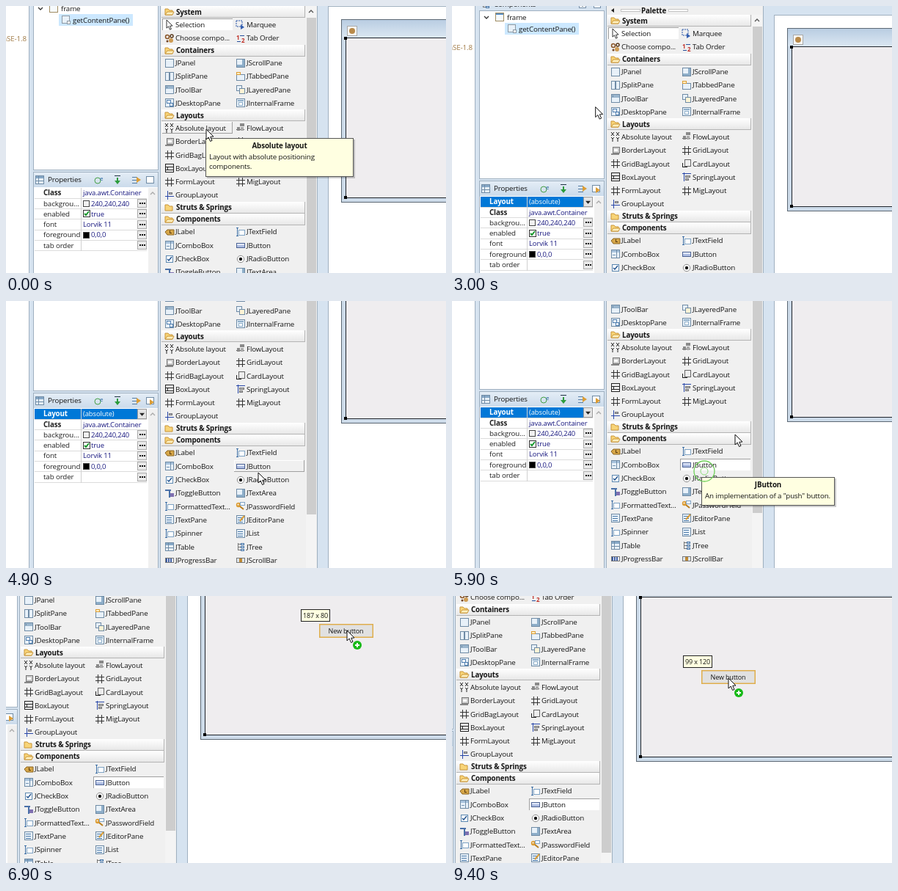
Write an HTML page with a canvas that moves like this. It is 600x364 px and loops after 9500 ms.

```html
<!DOCTYPE html>
<html lang="en">
<head>
<meta charset="utf-8">
<style>
  html, body { margin: 0; width: 100%; height: 100%; overflow: hidden; background: #fff; }
  canvas { display: block; }
</style>
</head>
<body>
<canvas id="stage" width="600" height="364"></canvas>
<script>
const g = document.getElementById('stage').getContext('2d');
const LOOP = 9500;
const BLUE = '#d6e3f0', EDGE = '#9fb0c0', INK = '#161616', STEEL = '#6f8ba5', PALE = '#e8f1f9', GOLD = '#dc9d35';

// Tracks: [time, x, y], eased between points
const camera = [[0, 0, 0], [800, 0, 1], [1600, 0, 19], [2700, 0, 19], [4200, 0, -50], [5000, 0, -103],
  [6000, 0, -103], [6900, -192, -72], [7300, -206, -60], [7800, -206, -49], [9400, -206, -42]];
const pointer = [[0, 273, 168], [700, 273, 168], [1700, 122, 26], [2100, 120, 20], [2600, 120, 20], [3600, 335, 320],
  [4200, 352, 371], [4800, 344, 335], [5700, 344, 335], [5900, 386, 285], [6900, 657, 119], [7800, 657, 94], [9400, 583, 154]];
const drop = [[5900, -138, 280], [6900, 187, 80], [7800, 192, 52], [9400, 99, 120]];
const clicks = [[500, 273, 168], [2200, 120, 20], [5600, 344, 335]];

function at(keys, t) {
  const i = keys.findIndex(k => k[0] > t);
  if (i < 0) return keys[keys.length - 1].slice(1);
  if (i === 0) return keys[0].slice(1);
  const a = keys[i - 1], b = keys[i], u = (t - a[0]) / (b[0] - a[0]), e = u * u * (3 - 2 * u);
  return [a[1] + (b[1] - a[1]) * e, a[2] + (b[2] - a[2]) * e];
}

function rect(c, x, y, w, h) { g.fillStyle = c; g.fillRect(x, y, w, h); }
function box(line, fill, x, y, w, h) { rect(line, x, y, w, h); rect(fill, x + 1, y + 1, w - 2, h - 2); }
function disc(c, x, y, r) { g.fillStyle = c; g.beginPath(); g.arc(x, y, r, 0, 7); g.fill(); }
function ring(c, x, y, r, w = 1) { g.strokeStyle = c; g.lineWidth = w; g.beginPath(); g.arc(x, y, r, 0, 7); g.stroke(); }
function path(pts, fill, line, w = 1) {
  g.beginPath();
  for (let i = 0; i < pts.length; i += 2) g.lineTo(pts[i], pts[i + 1]);
  if (fill) { g.closePath(); g.fillStyle = fill; g.fill(); }
  if (line) { g.strokeStyle = line; g.lineWidth = w; g.stroke(); }
}
function shade(top, bottom, y, h) {
  const fill = g.createLinearGradient(0, y, 0, y + h);
  fill.addColorStop(0, top);
  fill.addColorStop(1, bottom);
  return fill;
}
function text(s, x, y, { color = INK, bold = false, align = 'left', size = 9.8 } = {}) {
  g.font = `${bold ? 'bold ' : ''}${size}px "Open Sans", "Noto Sans", sans-serif`;
  g.letterSpacing = '-0.14px';
  g.textAlign = align;
  g.fillStyle = color;
  g.fillText(s, x, y + 3.5);
}
function moved(x, y, draw) { g.save(); g.translate(x, y); draw(); g.restore(); }

const arrow = [0, 0, 0, 14, 3.2, 11, 5.6, 16.5, 8, 15.4, 5.7, 10.3, 10, 10];
const pane = () => box(STEEL, PALE, -6, -6, 12, 12);
const hash = () => [-3, 2].forEach(p => { rect('#333', p, -6, 1, 12); rect('#333', -6, p, 12, 1); });
const field = () => { box('#7fa3c4', '#fff', -3, -3, 9, 8); rect('#3c6ea5', -5, -6, 1, 12); rect('#3c6ea5', -6, -6, 3, 1); rect('#3c6ea5', -6, 5, 3, 1); };
const page = () => { pane(); for (let y = -3; y < 5; y += 3) rect('#4b79a8', -4, y, 7, 1); };

// Icons are drawn around their own centre
const icons = {
  pane, hash, field, page,
  cursor() { moved(-4, -6, () => { g.scale(.8, .8); path(arrow.concat(0, 0), '#fff', '#000'); }); },
  marquee() { g.setLineDash([2, 1]); path([-6, -5, 2, -5, 2, 3, -6, 3, -6, -5], null, '#2856a8'); g.setLineDash([]); path([0, 0, 0, 7, 5, 4], '#345fb0'); },
  choose() { ring('#8a5527', -3, -2, 2.5, 1.5); ring('#5a3a1c', 3, -3, 2, 1.5); disc('#cf9c53', 2, 3, 3); disc('#704020', -3, 4, 1.5); },
  order() { text('1', -6, -2, { color: '#c03028', size: 8, bold: true }); text('2', 1, 2, { color: '#c03028', size: 8, bold: true }); rect('#274f9c', -1, -4, 6, 1); rect('#274f9c', -5, 4, 5, 1); },
  split() { pane(); rect(STEEL, -1, -6, 2, 12); },
  scroll() { pane(); rect('#8eaec9', 2, -5, 3, 10); rect('#8eaec9', -5, 2, 10, 3); },
  tabs() { box(STEEL, PALE, -6, -3, 12, 9); box(GOLD, '#fff0c6', -6, -6, 6, 4); },
  bar() { pane(); rect('#9bb6cd', -5, -5, 10, 4); rect(STEEL, -4, -4, 1, 2); },
  layers() { box(STEEL, PALE, -6, -6, 8, 8); box(STEEL, '#fff3d5', -2, -2, 8, 8); },
  frame() { box('#a08c62', '#f6fafd', -6, -6, 12, 12); rect('#5b8fc4', -5, -5, 10, 2); },
  inner() { pane(); rect('#8eaec9', -4, -4, 8, 2); box('#8eaec9', '#fff', -3, -1, 6, 5); },
  desktop() { pane(); box('#4d7daf', '#fff', -4, -4, 6, 5); box('#4d7daf', '#fff', 0, 0, 5, 5); },
  xy() {
    for (const x of [-6, 1]) {
      path([x, -6, x + 4, -1], null, '#222'); path([x + 4, -6, x, -1], null, '#222');
      path([x, 1, x + 2, 3, x + 4, 1], null, '#222'); rect('#222', x + 1.5, 3, 1, 4);
    }
  },
  flow() { rect('#8a8a8a', -1, -6, 6, 4); rect('#555', -6, 2, 11, 1); rect('#8a8a8a', -5, -1, 4, 5); rect('#aaa', 0, -1, 4, 5); },
  border() { box('#777', '#ccc', -4, -5, 10, 9); rect('#888', -6, 4, 11, 2); rect('#fff', -2, -2, 5, 3); },
  card() { box('#666', '#eee', -3, -6, 9, 10); rect('#222', -6, 4, 7, 1); rect('#222', -6, -1, 1, 6); },
  rows() { box('#222', '#f0f0f0', -6, -6, 12, 12); rect('#222', -6, -2, 12, 1); rect('#222', -6, 2, 12, 1); rect('#222', -3, -2, 1, 4); },
  spring() { rect('#2947a8', -4, -6, 1, 12); rect('#2947a8', -6, -5, 12, 1); box('#777', '#bbb', -2, -2, 7, 3); box('#777', '#bbb', -2, 2, 5, 3); },
  group() { rect('#2947a8', -3, -6, 1, 12); box('#777', '#aab', -1, -4, 5, 3); rect('#2947a8', -6, 1, 12, 1); },
  label() { path([-6, 0, -3, -3, 6, -3, 6, 4, -3, 4], '#d6a648', '#8a6420'); rect('#5a3c10', 0, -2, 1, 4); rect('#5a3c10', 0, 1, 3, 1); },
  combo() { pane(); rect('#a8c3dd', -5, -5, 10, 3); rect(STEEL, 1, -6, 1, 12); rect('#7394b4', -4, 1, 4, 1); },
  button() { box('#4b6294', '#aebde2', -6, -3, 12, 7); rect('#e3eafa', -5, -2, 10, 2); },
  check() { box('#5b87b0', '#fff', -5, -5, 10, 10); path([-3, 0, -1, 2, 3, -3], null, '#1d4f8c', 1.4); },
  radio() { disc('#fff', 0, 0, 5); ring('#8b8b8b', 0, 0, 4.7); disc('#151515', 0, 0, 2.2); },
  toggle() { rect('#4a70a8', -6, -5, 8, 2); rect('#4a70a8', -1, -5, 2, 11); rect('#7f70b0', 1, 0, 5, 5); },
  key() { disc(GOLD, -3, -2, 3.2); disc('#fff', -3.5, -2.5, 1); path([-1, 0, 4, 4], null, '#b97e1e', 2); box('#7fa3c4', '#fff', -1, -6, 7, 5); },
  pencil() { page(); path([5, -5, -1, 2], null, GOLD, 2); },
  grid() { pane(); rect('#86a8c7', -5, -5, 10, 3); rect(STEEL, -2, -5, 1, 11); rect(STEEL, -5, 1, 11, 1); },
  tree() { rect('#777', -4, -5, 1, 10); for (let i = -1; i < 2; i++) { rect('#777', -4, i * 4, 4, 1); box('#4a76a7', '#cbdff2', 0, i * 4 - 1, 5, 3); } },
  progress() { box('#777', '#fff', -6, -3, 12, 7); for (let x = -5; x < 3; x += 3) rect('#3f5fa5', x, -2, 2, 5); },
  slider() { box('#777', '#dde6ef', -6, -3, 12, 7); rect('#c08a34', -2, -2, 4, 5); }
};

const palette = [
  ['System', 'Selection:cursor Marquee:marquee Choose_compo...:choose Tab_Order:order'],
  ['Containers', 'JPanel:pane JScrollPane:scroll JSplitPane:split JTabbedPane:tabs JToolBar:bar JLayeredPane:layers JDesktopPane:desktop JInternalFrame:inner'],
  ['Layouts', 'Absolute_layout:xy FlowLayout:flow BorderLayout:border GridLayout:hash GridBagLayout:hash CardLayout:card BoxLayout:rows SpringLayout:spring FormLayout:hash MigLayout:hash GroupLayout:group'],
  ['Struts & Springs', ''],
  ['Components', 'JLabel:label JTextField:field JComboBox:combo JButton:button JCheckBox:check JRadioButton:radio JToggleButton:toggle JTextArea:scroll JFormattedText...:field JPasswordField:key JTextPane:page JEditorPane:pencil JSpinner:field JList:page JTable:grid JTree:tree JProgressBar:progress JScrollBar:slider']
];

function drawFolder(x, y, open) {
  path([x - 6, y + 4, x - 6, y - 4, x - 2, y - 4, x, y - 2, x + 4, y - 2, x + 4, y + 4], '#f8d478', '#c99538');
  if (open) path([x - 6, y + 4, x - 3, y, x + 6, y, x + 4, y + 4, x - 6, y + 4], '#fff0bd', '#c99538');
}

function drawItem(entry, column, y, active, px, py) {
  const [name, icon] = entry.replace('_', ' ').split(':');
  const x = column ? 311 : 213, w = 96, top = Math.round(y - 8), h = 16;
  const hovered = px >= x && px < x + w && Math.abs(py - y) < 9;
  if (name === active) {
    rect('#a0a0a0', x, top, w, h);
    rect('#fff', x + 1, top + 1, w - 1, h - 1);
  } else if (hovered) {
    rect('#a0a0a0', x, top, w, h);
    rect('#fff', x, top, w - 1, h - 1);
    rect('#f0f0f0', x + 1, top + 1, w - 2, h - 2);
  }
  moved(column ? 320 : 223, Math.round(y), icons[icon]);
  text(name, column ? 328 : 231, y);
}

function drawPalette(active, px, py) {
  rect(EDGE, 210, -14, 215, 700);
  rect('#f0f0f0', 211, -13, 213, 700);
  path([217, -6, 221, -9, 221, -3], '#222');
  text('Palette', 275, -6, { bold: true, align: 'center' });
  for (const x of [230, 295]) box('#c4c4c4', '#fff', x, -8, 27, 4);
  rect('#f4f4f4', 409, 0, 14, 600);
  path([413, 9, 416, 6, 419, 9], null, '#555', 1.3);
  rect('#cdcdcd', 410, 16, 13, 376);
  let y = 8.2;
  for (const [title, list] of palette) {
    const top = Math.round(y - 8);
    rect('#b4b4b4', 212, top, 196, 16);
    rect(shade('#fff', '#e6e6e6', top, 16), 212, top, 195, 15);
    drawFolder(223, Math.round(y), list);
    text(title, 232, y, { bold: true });
    const items = list ? list.split(' ') : [];
    items.forEach((item, i) => drawItem(item, i % 2, y + 17 + 18.3 * (i >> 1), active, px, py));
    y += items.length ? 34 + 18.3 * (Math.ceil(items.length / 2) - 1) : 16;
  }
}

function drawTree() {
  rect(EDGE, 37, -6, 171, 230);
  rect('#fff', 38, -5, 169, 228);
  text('Components', 57, -14.5);
  moved(46, -15, icons.tree);
  for (const x of [173, 193]) {
    box('#7890a8', '#f4f8fc', x, -19, 10, 10);
    rect('#345', x + 2, -14.5, 6, 1);
  }
  rect('#345', 177.5, -17, 1, 6);
  path([44, 2, 47, 5, 50, 2], null, '#333', 1.3);
  moved(65, 3, icons.frame);
  text('frame', 75, 3);
  rect('#cce8ff', 72, 11, 101, 16);
  moved(82, 19, () => { box('#8d99a3', PALE, -6, -6, 11, 11); box('#8d99a3', '#fff', 1, 1, 5, 5); });
  text('getContentPane()', 91, 19);
}

function drawProperties(laidOut) {
  rect(EDGE, 37, 226, 171, 450);
  rect(shade('#e4edf6', '#cbdbeb', 227, 20), 38, 227, 169, 20);
  rect('#fff', 38, 247, 169, 430);
  moved(46, 237, icons.grid);
  text('Properties', 57, 236.5);
  ring('#45a046', 125, 238, 4);
  text('e', 128, 234, { size: 8, color: '#2563a0' });
  rect('#2c9c3c', 151, 234, 2, 7);
  path([148, 238, 152, 243, 156, 238], '#2c9c3c');
  rect('#234', 148, 231, 8, 1);
  for (let i = 0; i < 3; i++) rect('#557da5', 172, 233 + i * 4, 7, 1);
  path([178, 233, 184, 237, 178, 241], GOLD);
  box(STEEL, '#fff', 191, 232, 11, 10);
  if (laidOut) path([196, 235, 202, 239, 196, 243], GOLD);
  rect('#f0f0f0', 194, 248, 13, 430);
  path([197, 257, 200, 254, 203, 257], null, '#aaa', 1.3);

  const rows = [['Class', 'java.awt.Container'], ['backgrou...', '240,240,240', '#f0f0f0'], ['enabled', 'true', 'check'],
    ['font', 'Lorvik 11'], ['foreground', '0,0,0', '#000'], ['tab order', '']];
  if (laidOut) rows.unshift(['Layout', '(absolute)']);
  rows.forEach(([name, value, mark], i) => {
    const y = 254.7 + i * 14.3, top = Math.round(y - 7), selected = name === 'Layout';
    if (selected) rect('#0078d7', 39, top, 153, 14);
    rect('#dcdcdc', 39, top + 14, 153, 1);
    rect('#d0d0d0', 102, top, 1, 15);
    const bold = selected || name === 'Class';
    text(name, 51, y, { bold, color: selected ? '#fff' : '#222' });
    if (mark === 'check') moved(110, Math.round(y), () => {
      box('#333', '#fff', -5, -5, 10, 10);
      path([-3, 0, -1, 2, 3, -3], null, '#14962a', 2);
    });
    else if (mark) box('#444', mark, 105, top + 3, 9, 9);
    text(value, mark ? 116 : 105, y, { color: selected ? '#fff' : '#17177f', size: 9.5 });
    if (selected) {
      box('#999', '#e4e4e4', 179, top, 13, 14);
      path([182, y - 1, 189, y - 1, 185.5, y + 3], '#222');
    } else if (i >= rows.length - 5) {
      box('#aaa', '#e9e9e9', 179, top + 1, 13, 12);
      for (let k = 0; k < 3; k++) rect('#111', 182 + k * 3, top + 6, 2, 2);
    }
  });
}

function drawEditor() {
  rect(EDGE, 425, -17, 900, 1);
  rect(EDGE, 439, 0, 900, 700);
  rect('#fff', 440, 1, 900, 700);
  rect('#5c6874', 457, 18, 900, 250);
  rect('#cddbe9', 458, 19, 900, 248);
  rect(shade('#b9cde2', '#dbe7f2', 19, 24), 458, 19, 900, 24);
  box('#a9a9a9', '#f7f7f4', 465, 27, 14, 14);
  disc('#b98a4a', 472, 34, 4);
  rect('#20252c', 463, 43, 900, 219);
  rect('#efedef', 464, 44, 900, 217);
  rect('#000', 461, 42, 4, 4);
  rect('#000', 461, 259, 4, 4);
}

function tooltip(x, y, w, h, title, lines) {
  rect('rgba(0,0,0,.2)', x + 2, y + 2, w, h);
  box('#555', '#ffffe1', x, y, w, h);
  text(title, x + w / 2, y + 10, { bold: true, align: 'center' });
  lines.forEach((line, i) => text(line, x + 5, y + 25 + i * 13));
}

function drawDrag(t) {
  const [vx, vy] = at(drop, t).map(Math.round);
  const x = Math.round(463.8 + .83 * vx), y = Math.round(43.6 + .83 * vy);
  rect('#dfae4c', x, y, 74, 19);
  rect('#e1e1e1', x + 1.5, y + 1.5, 71, 16);
  text('New button', x + 36.5, y + 9, { align: 'center', size: 9 });
  box('#222', '#ffffe1', x - 25, y - 20, 40, 17);
  text(`${vx} x ${vy}`, x - 22, y - 12, { size: 9 });
}

function drawBadge(x, y, allowed) {
  disc(allowed ? '#16b916' : '#e8592c', x, y, 6);
  rect('#fff', x - 3, y - 1, 6, 2);
  if (allowed) rect('#fff', x - 1, y - 3, 2, 6);
}

function draw(t) {
  const active = t < 500 ? 'Selection' : t < 2400 ? 'Absolute layout' : t < 5500 ? 'Selection' : 'JButton';
  const armed = active !== 'Selection';
  const [cx, cy] = at(camera, t).map(Math.round);
  const [px, py] = at(pointer, t);
  const inForm = px > 463 && py > 44 && py < 262;

  rect(BLUE, 0, 0, 600, 364);
  g.save();
  g.translate(cx, cy);
  rect('#fff', -20, -60, 51, 700);
  rect(EDGE, 31, -60, 1, 700);
  text('JavaSE-1.8', 28, 44.5, { color: '#a07a45', align: 'right' });
  drawTree();
  drawProperties(t >= 2400);
  drawPalette(active, px, py);
  drawEditor();
  if (armed && inForm) drawDrag(t);
  if (t < 600) tooltip(272, 180, 202, 53, 'Absolute layout', ['Layout with absolute positioning', 'components.']);
  if (t >= 5200 && t < 6100) tooltip(340, 343, 182, 39, 'JButton', ['An implementation of a "push" button.']);
  for (const [start, x, y] of clicks) {
    const age = (t - start) / 300;
    if (age >= 0 && age < 1.3) {
      ring('#6fd05a', x, y, 4 + 10 * age, 1.3);
      ring('#8bdc78', x, y, 2 + 3 * age);
    }
  }
  if (armed && (px < 208 || px > 440)) drawBadge(px + 14, py + 20, inForm);
  moved(px, py, () => path(arrow.concat(0, 0), '#fff', '#111'));
  g.restore();
}

function tick() {
  draw(Math.floor(performance.now() % LOOP / 100) * 100);
  requestAnimationFrame(tick);
}
tick();
</script>
</body>
</html>
```
